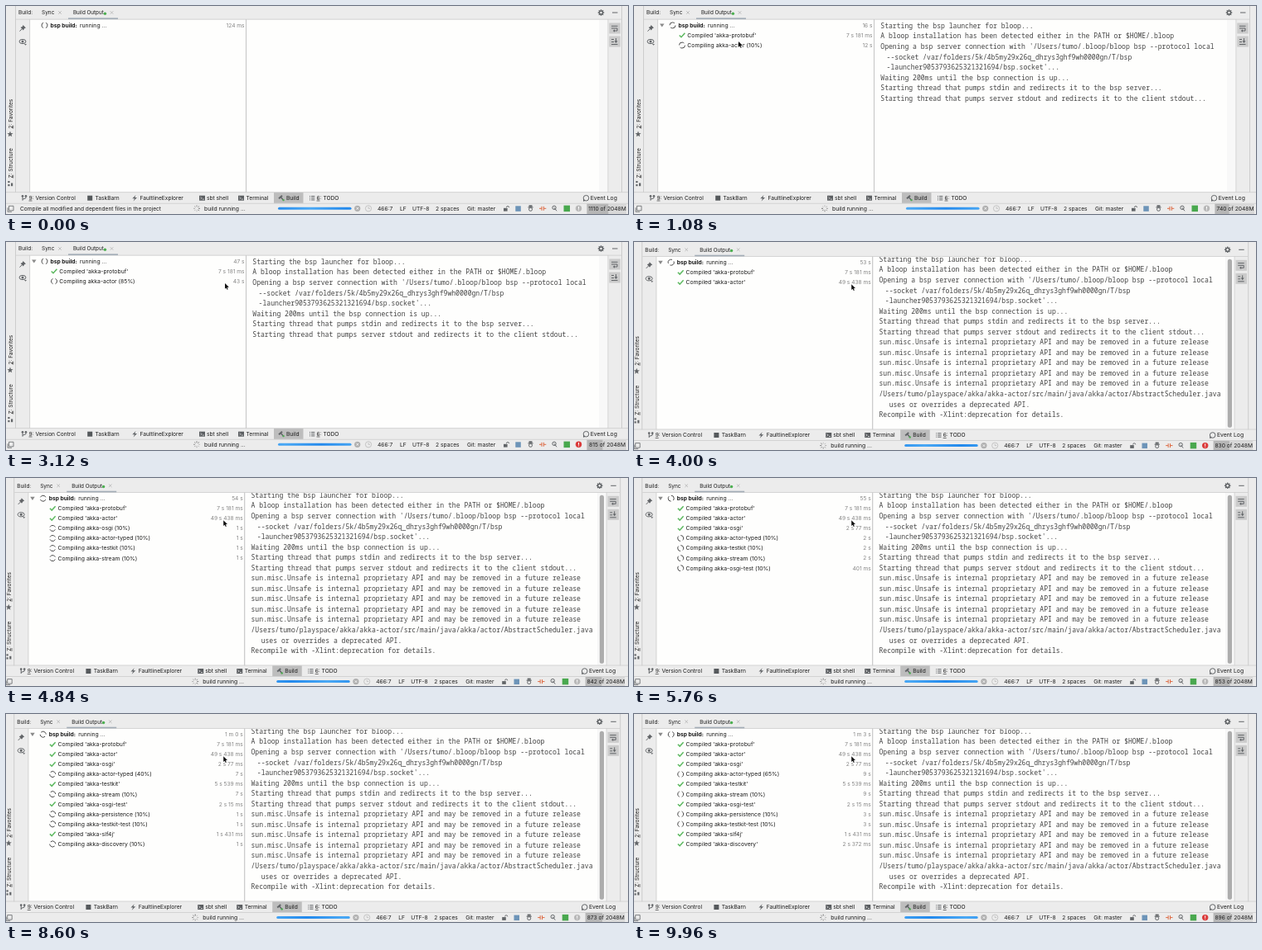
Animation of 750 by 252 pixels, one loop 10 s. Source, as an HTML page with a canvas:

```html
<!DOCTYPE html>
<html lang="en">
<head>
<meta charset="utf-8">
<title>Build output</title>
<style>
html, body { margin: 0; width: 100%; height: 100%; overflow: hidden; background: #ececec; }
canvas { display: block; width: 750px; height: 252px; }
</style>
</head>
<body>
<canvas id="stage"></canvas>
<script>
const W = 750, H = 252, LOOP = 10000, STEP = 40, SHIFT_AT = 3520;
const canvas = document.getElementById('stage');
const ctx = canvas.getContext('2d');
const ratio = window.devicePixelRatio || 1;
canvas.width = W * ratio;
canvas.height = H * ratio;

const UI = 'Inter, "Open Sans", sans-serif';
const MONO = '"Noto Sans Mono", "DejaVu Sans Mono", monospace';
const INK = '#1c1c1c', ICON = '#626568', PANEL = '#ececec', LINE = '#cdcdcd', PAPER = '#fefefd';
const LOG_SCROLL_AT = 52.6;

// Build seconds against playback milliseconds: fast first, then close to real time.
const CLOCK = [[0, .124], [1080, 16.4], [3120, 47.1], [SHIFT_AT, 52.6], [4000, 53.3],
  [5760, 55.95], [7400, 58.6], [9960, 63.05], [LOOP, 63.1]];
const MEMORY = [[0, 1110], [240, 1146], [280, 704], [1080, 740], [3120, 815], [4000, 830],
  [5600, 853], [7400, 853], [9960, 896], [LOOP, 896]];
const POINTER_X = [[300, 158], [900, 126], [1160, 126], [1640, 264]];
const POINTER_Y = [[300, -12], [900, 43], [1160, 43], [1640, 50]];

const TASKS = [
  { name: 'akka-protobuf', start: 3.75, length: 7.181, progress: [[4, 10], [10.8, 90]] },
  { name: 'akka-actor', start: 3.76, length: 49.438, progress: [[16.5, 10], [46, 85], [52, 90]] },
  { name: 'akka-osgi', start: 53.47, length: 2.077, progress: [[53, 10]] },
  { name: 'akka-actor-typed', start: 53.5, progress: [[56.2, 10], [58.5, 25], [63, 65]] },
  { name: 'akka-testkit', start: 53.5, length: 5.539, progress: [[56, 10], [58.5, 90]] },
  { name: 'akka-stream', start: 53.5, progress: [[53, 10]] },
  { name: 'akka-osgi-test', start: 55.5488, length: 2.015, progress: [[55, 10]] },
  { name: 'akka-persistence', start: 59.06, progress: [[59, 10]] },
  { name: 'akka-testkit-test', start: 59.06, progress: [[59, 10]] },
  { name: 'akka-slf4j', start: 59.08, length: 1.431, progress: [[59, 10]] },
  { name: 'akka-discovery', start: 59.1, length: 2.372, progress: [[59, 10]] }
];

const UNSAFE = 'sun.misc.Unsafe is internal proprietary API and may be removed in a future release';
// [build second, text, wrapped continuation]
const LOG = [
  [.8, 'Starting the bsp launcher for bloop...'],
  [1.4, 'A bloop installation has been detected either in the PATH or $HOME/.bloop'],
  [1.4, "Opening a bsp server connection with '/Users/tumo/.bloop/bloop bsp --protocol local"],
  [1.4, '--socket /var/folders/5k/4b5my29x26q_dhrys3ghf9wh0000gn/T/bsp', true],
  [1.4, "-launcher9053793625321321694/bsp.socket'...", true],
  [1.4, 'Waiting 200ms until the bsp connection is up...'],
  [2.6, 'Starting thread that pumps stdin and redirects it to the bsp server...'],
  [2.6, 'Starting thread that pumps server stdout and redirects it to the client stdout...'],
  ...Array.from({ length: 5 }, () => [49.5, UNSAFE]),
  [LOG_SCROLL_AT, '/Users/tumo/playspace/akka/akka-actor/src/main/java/akka/actor/AbstractScheduler.java'],
  [LOG_SCROLL_AT, ' uses or overrides a deprecated API.', true],
  [LOG_SCROLL_AT, 'Recompile with -Xlint:deprecation for details.']
];

function track(keys, at, ease = u => u) {
  if (at <= keys[0][0]) return keys[0][1];
  for (let i = 1; i < keys.length; i++) {
    const [a, from] = keys[i - 1], [b, to] = keys[i];
    if (at <= b) return from + (to - from) * ease((at - a) / (b - a));
  }
  return keys[keys.length - 1][1];
}
const smooth = u => u * u * (3 - 2 * u);

function rect(x, y, w, h, color) {
  ctx.fillStyle = color;
  ctx.fillRect(x, y, w, h);
}
function pill(x, y, w, h, color) {
  ctx.beginPath();
  ctx.roundRect(x, y, w, h, Math.min(w, h) / 2);
  ctx.fillStyle = color;
  ctx.fill();
}
function text(str, x, y, { size = 6.7, color = INK, weight = 400, align = 'left', font = UI } = {}) {
  ctx.font = `${weight} ${size}px ${font}`;
  ctx.textAlign = align;
  ctx.fillStyle = color;
  ctx.fillText(str, x, y + size * .355);
}
function stroke(points, color = ICON, width = 1, close = false) {
  ctx.beginPath();
  points.forEach(([x, y]) => ctx.lineTo(x, y));
  if (close) ctx.closePath();
  ctx.strokeStyle = color;
  ctx.lineWidth = width;
  ctx.stroke();
}
function fill(points, color = ICON) {
  ctx.beginPath();
  points.forEach(([x, y]) => ctx.lineTo(x, y));
  ctx.fillStyle = color;
  ctx.fill();
}
function arc(x, y, r, color = ICON, width = 1, from = 0, to = Math.PI * 2) {
  ctx.beginPath();
  ctx.arc(x, y, r, from, to);
  ctx.strokeStyle = color;
  ctx.lineWidth = width;
  ctx.stroke();
}
function disc(x, y, r, color = ICON) {
  ctx.beginPath();
  ctx.arc(x, y, r, 0, Math.PI * 2);
  ctx.fillStyle = color;
  ctx.fill();
}
function cross(x, y, r, color, width = .8) {
  stroke([[x - r, y - r], [x + r, y + r]], color, width);
  stroke([[x - r, y + r], [x + r, y - r]], color, width);
}
function ring(x, y, seconds) {
  const turn = Math.floor(seconds * 8) * Math.PI / 8;
  for (const base of [turn, turn + Math.PI])
    arc(x, y, 3.5, '#4c4c4c', 1, base - 1.15, base + 1.15);
}
function tick(x, y) {
  stroke([[x - 3.3, y], [x - 1, y + 2.3], [x + 3.4, y - 2.6]], '#5cb85f', 1.5);
}
function listIcon(x, y) {
  for (let i = -1; i <= 1; i++) {
    rect(x - 3, y + i * 2.2 - .5, 1, 1, ICON);
    rect(x - 1, y + i * 2.2 - .5, 4.3, 1, ICON);
  }
}
function terminalIcon(x, y) {
  rect(x - 3.5, y - 3, 7, 6, '#5b5e61');
  stroke([[x - 2, y - 1.5], [x - .5, y], [x - 2, y + 1.5]], '#fff', .7);
  rect(x + .3, y + 1, 2, .7, '#fff');
}
function hammer(x, y) {
  stroke([[x - .5, y - 1], [x + 3, y + 3]], ICON, 1.4);
  stroke([[x - 3, y + .5], [x + 1, y - 3]], ICON, 2);
  disc(x + 2.5, y + 2.4, 1.2, '#4caf50');
}
function gear(x, y) {
  for (let i = 0; i < 8; i++) {
    const a = i * Math.PI / 4;
    stroke([[x + 2 * Math.cos(a), y + 2 * Math.sin(a)], [x + 3.8 * Math.cos(a), y + 3.8 * Math.sin(a)]], ICON, 1.3);
  }
  arc(x, y, 2.1, ICON, 1.5);
}

function duration(seconds, exact) {
  const whole = Math.floor(seconds), ms = Math.floor((seconds - whole) * 1000 + 1e-6);
  if (exact) return `${whole} s ${Math.round((seconds - whole) * 1000)} ms`;
  if (whole < 1) return `${ms} ms`;
  return whole < 60 ? `${whole} s` : `${Math.floor(whole / 60)} m ${whole % 60} s`;
}

function drawFrame() {
  rect(-5, -5, 760, 262, PANEL);
  rect(29, 16.5, 260, 209, PAPER);
  rect(290, 16.5, 425, 209, PAPER);
  rect(715, 16.5, 11, 209, '#f8f8f8');
  rect(11, -5, 1, 231, LINE);
  rect(742, -5, 1, 231, LINE);
  rect(28.3, 16, .8, 210, LINE);
  rect(289, 16, 1, 210, '#c4c4c4');
  rect(725.5, 16, .8, 210, LINE);
  rect(12, 15.7, 730, .8, LINE);
  rect(-5, 225.3, 760, .8, LINE);
  rect(-5, 238.8, 760, .8, LINE);
}

function drawHeader() {
  const y = 8;
  text('Build:', 15, y, { size: 6.5 });
  text('Sync', 43, y, { size: 6.5 });
  cross(65, y, 1.8, '#b4b4b4');
  text('Build Output', 81, y, { size: 6.3 });
  disc(119.4, y + 1.2, 1.7, '#4caf50');
  cross(127.5, y, 1.8, '#b4b4b4');
  rect(75, 14.4, 60, 1.6, '#a3adb7');
  gear(717.5, y);
  rect(731, y - .5, 6.5, 1, ICON);
}

function drawSideBars() {
  // pin and eye
  fill([[20.5, 23], [24, 26.5], [22.4, 27], [20.8, 29.4], [17.6, 26], [20, 24.7]]);
  stroke([[19.2, 27.8], [16.5, 30.6]]);
  ctx.beginPath();
  ctx.ellipse(20, 43, 4, 2.6, 0, 0, Math.PI * 2);
  ctx.strokeStyle = ICON;
  ctx.lineWidth = 1;
  ctx.stroke();
  disc(20, 43, 1.5);
  fill([[22, 46], [25, 46], [23.5, 47.7]]);

  for (const y of [27, 43]) rect(727.3, y - 6.5, 13.5, 13, '#cbcbcb');
  rect(730, 23.8, 7.5, 1, ICON);
  stroke([[730, 27], [737, 27], [737, 30], [733, 30]]);
  fill([[734, 28.2], [734, 31.8], [731.8, 30]]);
  rect(730, 46, 7.5, 1, ICON);
  rect(730, 40, 3, 1, ICON);
  rect(730, 43, 3, 1, ICON);
  stroke([[735.5, 39], [735.5, 43]]);
  fill([[733.5, 42.3], [737.5, 42.3], [735.5, 45]]);

  for (const [label, y] of [['2: Favorites', 148.5], ['Z: Structure', 208.5]]) {
    ctx.save();
    ctx.translate(5.3, y);
    ctx.rotate(-Math.PI / 2);
    text(label, 0, 0, { size: 6.5 });
    rect(0, 3.2, 3.8, .6, INK);
    ctx.restore();
  }
  const star = Array.from({ length: 10 }, (_, i) => {
    const a = i * Math.PI / 5 - Math.PI / 2, r = i % 2 ? 1.6 : 3.8;
    return [5 + r * Math.cos(a), 155.3 + r * Math.sin(a)];
  });
  fill(star);
  rect(2.3, 212, 2.2, 2.2, ICON);
  rect(2.3, 216, 2.2, 2.2, ICON);
  rect(6, 214.5, 2.2, 3.7, ICON);
}

function drawToolTabs() {
  const y = 232.7;
  rect(323, 226.1, 35.5, 12.7, '#bdbdbd');
  stroke([[20, y - 2], [20, y + 3]]);
  stroke([[24, y - 2], [24, y], [20, y + 1.5]]);
  disc(20, y - 2.5, 1.3);
  disc(24, y - 2.5, 1.3);
  rect(98.2, y - 3, 6, 6, '#55595c');
  fill([[156.5, y - 3.8], [152.3, y + .6], [155, y + .6], [153.5, y + 3.8], [158, y - .8], [155.3, y - .8]]);
  terminalIcon(236.5, y);
  terminalIcon(283.5, y);
  hammer(332, y);
  listIcon(369, y);
  [['9: Version Control', 27.5], ['TaskBarn', 107.5], ['FaultlineExplorer', 161.5], ['sbt shell', 242],
    ['Terminal', 289.5], ['Build', 338], ['6: TODO', 374.5]].forEach(([label, x]) => text(label, x, y, { size: 6.65 }));
  rect(27.5, y + 3, 4, .6, INK);
  rect(374.5, y + 3, 4, .6, INK);
  arc(699.5, y, 3.3);
  fill([[696, y + 1], [698.5, y + 3.2], [696, y + 4]]);
  text('Event Log', 704.7, y, { size: 6.85 });
}

function drawStatusBar(ms, seconds) {
  const y = 245.3;
  stroke([[3.5, y - 3], [9, y - 3], [9, y + 2.5], [3.5, y + 2.5]], ICON, .8, true);
  stroke([[2, y - 1], [2, y + 4], [7, y + 4]], ICON, .8);
  if (ms < 200) text('Compile all modified and dependent files in the project', 17, y, { size: 6.6 });

  const head = Math.floor(seconds * 10);
  for (let i = 0; i < 8; i++) {
    const a = i * Math.PI / 4, shade = 100 + ((head - i) % 8 + 8) % 8 * 13;
    stroke([[230 + 2 * Math.cos(a), y + 2 * Math.sin(a)], [230 + 4 * Math.cos(a), y + 4 * Math.sin(a)]],
      `rgb(${shade},${shade},${shade})`, .9);
  }
  text('build running ...', 239, y, { size: 6.8 });

  const phase = seconds * 40 % 88;
  const glow = ctx.createLinearGradient(328 - phase, 0, 504 - phase, 0);
  for (let i = 0; i <= 4; i++) glow.addColorStop(i / 4, i % 2 ? '#4aa8f4' : '#2389ec');
  pill(328, y - 1.5, 88.5, 3, glow);
  disc(423.7, y, 3.6, '#b0b0b0');
  cross(423.7, y, 1.3, '#fff');
  arc(437, y, 3.6, '#bababa', .8);
  stroke([[437, y - 2], [437, y], [439, y]], '#bababa', .8);

  [['466:7', 448], ['LF', 475], ['UTF-8', 490], ['2 spaces', 518], ['Git: master', 556]]
    .forEach(([label, x]) => text(label, x, y, { size: 6.7 }));

  rect(600, y - .5, 4.6, 3.8, ICON);
  arc(605, y - 1.2, 1.6, ICON, .9, Math.PI, Math.PI * 2);
  rect(614.3, y - 3, 6.5, 6.5, '#6d94b8');
  rect(629.5, y - 2, 6, 1.2, ICON);
  rect(630.5, y - 4, 4, 2, ICON);
  arc(632.5, y + 1, 2, ICON, 1);
  stroke([[643, y], [646, y]], '#dd6a43', 1);
  stroke([[646, y - 2.5], [646, y + 2.5]], '#dd6a43', 1);
  stroke([[648.3, y - 2.5], [648.3, y + 2.5]], '#dd6a43', 1);
  stroke([[648.3, y], [651.3, y]], '#dd6a43', 1);
  arc(661, y - 1, 2.2, ICON, 1);
  stroke([[661, y - 1], [664, y + 3]], ICON, 1);
  rect(672.5, y - 3.7, 7.5, 7.5, '#49a84e');
  const alert = Math.floor(seconds + .15) % 2 === 1;
  disc(690.5, y, 3.7, alert ? '#db3b3b' : '#b8b8b8');
  rect(690, y - 2.3, 1, 2.8, '#fff');
  rect(690, y + 1.2, 1, 1, '#fff');

  const used = Math.round(track(MEMORY, ms));
  rect(700.5, 239.6, 47.5, 15, '#d8d8d8');
  rect(700.5, 239.6, 47.5 * used / 2048, 15, '#b6b6b6');
  text(`${used} of 2048M`, 725, y, { size: 6.7, align: 'center' });
}

function drawTree(seconds) {
  const label = { size: 6.85 };
  const soft = { color: '#848484', align: 'right', size: 6.6 };
  const tasks = TASKS.filter(task => seconds >= task.start);
  let y = 23.4;
  if (tasks.length) fill([[31, y - 2], [36.5, y - 2], [33.75, y + 2.2]], '#8a8a8a');
  ring(46.5, y, seconds);
  text('bsp build:', 53.5, y, { weight: 700, size: 6.7 });
  text('running ...', 89, y, label);
  text(duration(seconds), 287.5, y, soft);
  for (const task of tasks) {
    y += 12.07;
    const age = seconds - task.start;
    if (age >= task.length) {
      tick(58, y);
      text(`Compiled '${task.name}'`, 64.3, y, label);
      text(duration(task.length, true), 287.5, y, soft);
    } else {
      const percent = Math.floor(track(task.progress, seconds) / 5) * 5;
      ring(58, y, seconds);
      text(`Compiling ${task.name} (${percent}%)`, 64.3, y, label);
      text(duration(age), 287.5, y, soft);
    }
  }
}

function drawLog(seconds) {
  const scrolled = seconds >= LOG_SCROLL_AT;
  const top = scrolled ? 19.7 : 24;
  const style = { size: 8.08, font: MONO, color: '#444' };
  ctx.save();
  ctx.beginPath();
  ctx.rect(290, 16.8, 425, 208.5);
  ctx.clip();
  LOG.forEach(([at, line, wrapped], i) => {
    if (seconds >= at) text(line, wrapped ? 304.6 : 297.3, top + i * 12.55, style);
  });
  ctx.restore();
  if (scrolled) pill(717.6, 19.5, 5.2, 204, '#adadad');
}

function drawPointer(ms) {
  const x = track(POINTER_X, ms, smooth), y = track(POINTER_Y, ms, smooth);
  const shape = [[0, 0], [0, 6.8], [1.5, 5.4], [2.6, 7.8], [3.7, 7.3], [2.6, 5], [4.8, 4.8]].map(([dx, dy]) => [x + dx, y + dy]);
  stroke(shape, '#fff', 1.2, true);
  fill(shape, '#111');
}

const began = performance.now();
function render() {
  const elapsed = (performance.now() - began + 1) % LOOP;
  const ms = Math.floor(elapsed / STEP) * STEP;
  const seconds = track(CLOCK, ms);
  ctx.setTransform(ratio, 0, 0, ratio, 0, 0);
  // The window sits slightly lower and further left after the jump.
  if (ms >= SHIFT_AT) ctx.translate(-1.8, 1.3);
  drawFrame();
  drawHeader();
  drawSideBars();
  drawToolTabs();
  drawStatusBar(ms, seconds);
  drawTree(seconds);
  drawLog(seconds);
  drawPointer(ms);
  requestAnimationFrame(render);
}
render();
</script>
</body>
</html>
```
